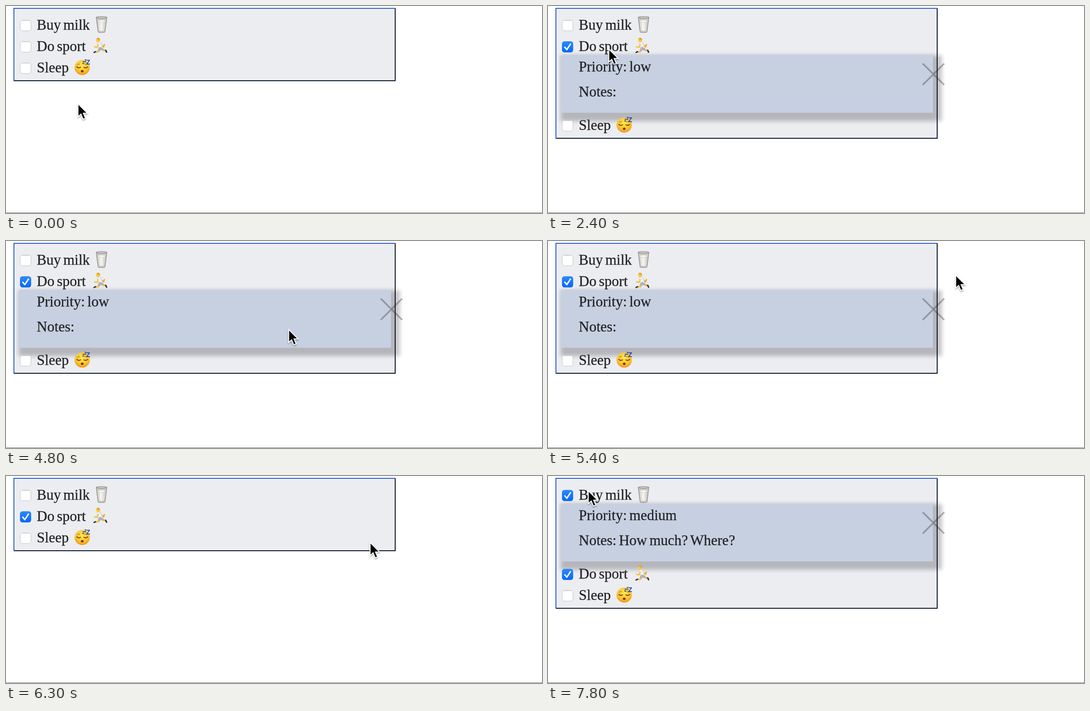
An HTML page for the animation above (7900 ms loop, 1150x446 px).

```html
<!DOCTYPE html>
<html lang="en">
<head>
<meta charset="utf-8">
<title>To-do list</title>
<style>
  html, body { margin: 0; width: 100%; height: 100%; overflow: hidden; background: #fff; }
  svg { display: block; width: 1150px; height: 446px; }
  .label { font: 31px "Liberation Serif", "Noto Serif", serif; word-spacing: -2.5px; fill: #222224; stroke: #222224; stroke-width: .3px; }
  .zzz { font-family: "Liberation Sans", sans-serif; font-weight: bold; fill: #1d3fa0; }
</style>
</head>
<body>
<svg viewBox="0 0 1150 446">
  <defs>
    <filter id="soft" x="-5%" y="-20%" width="110%" height="140%"><feGaussianBlur stdDeviation="4"/></filter>
    <filter id="drop" x="-50%" y="-50%" width="200%" height="200%">
      <feDropShadow dx="0" dy="2" stdDeviation="1.6" flood-color="#000" flood-opacity=".4"/>
    </filter>
    <linearGradient id="blue" x2="0" y2="1"><stop stop-color="#2d89ff"/><stop offset="1" stop-color="#0868f7"/></linearGradient>
    <linearGradient id="milk"><stop stop-color="#cfcdc6"/><stop offset=".45" stop-color="#f8f7f3"/><stop offset="1" stop-color="#cbc9c2"/></linearGradient>
    <radialGradient id="face" cx=".5" cy=".35" r=".68">
      <stop stop-color="#ffe558"/><stop offset=".6" stop-color="#fdc62f"/><stop offset="1" stop-color="#ee8f16"/>
    </radialGradient>

    <g id="box">
      <rect x="30.5" y="30.5" width="23" height="23" rx="5" fill="#fff" stroke="#c3c3c6"/>
      <path d="M34 31.5h16" stroke="#dedee0"/>
    </g>
    <g id="tick">
      <rect x="30" y="30" width="24" height="24" rx="5.5" fill="url(#blue)"/>
      <path d="M36 42.8l4.4 5.2 7.8-12" fill="none" stroke="#fff" stroke-width="3" stroke-linecap="round" stroke-linejoin="round"/>
    </g>

    <g id="glass">
      <path d="M193.500 24l4 31.500q.3 1.500 2 1.500h11q1.700 0 2-1.500l4-31.500z" fill="#c9c8c5" stroke="#777672"/>
      <path d="M196.500 32.500h17l-2.600 20q-6 2.500-11.800 0z" fill="url(#milk)"/>
      <ellipse cx="205" cy="32.500" rx="8.500" ry="2" fill="#fffefa" stroke="#bdbbb5" stroke-width=".7"/>
      <ellipse cx="205" cy="24.500" rx="11.500" ry="1.800" fill="#d8d7d4" stroke="#777672"/>
    </g>
    <g id="runner" fill="none" stroke-linecap="round" stroke-linejoin="round">
      <path d="M204 38l5.500 4 1.500-5" stroke="#efaa24" stroke-width="2.800"/>
      <path d="M205 46l4 3 4.500 1" stroke="#f2b52f" stroke-width="4"/>
      <path d="M200 48l-1.500 4-5.500 1" stroke="#f7c441" stroke-width="4"/>
      <path d="M214 49.500l1.800 4M192 52.500l-3 1.500" stroke="#202d48" stroke-width="3"/>
      <path d="M199.500 35.500l3.500 8" stroke="#c9ced4" stroke-width="9.500"/>
      <path d="M199.500 35.500l3.500 8" stroke="#f1f2f1" stroke-width="7"/>
      <path d="M202 45l4 2M201 46l-1 2.500" stroke="#aab2c1" stroke-width="5.500"/>
      <path d="M198 37l-2.500 6-5.500-1" stroke="#f7c441" stroke-width="2.800"/>
      <circle cx="197.500" cy="27.500" r="4.200" fill="#fac83d"/>
      <path d="M193.800 25q1.700-4.200 6.200-1.800 2.800 1.800 1.600 5.500-2-2.700-7.800-3.700z" fill="#e3a51d"/>
    </g>
    <g id="sleepy" fill="none" stroke-linecap="round">
      <circle cx="163.500" cy="40.500" r="16.300" fill="url(#face)"/>
      <path d="M152 39q3.500 4 8 1M167 40q4.500 3 8-1" stroke="#70420f" stroke-width="1.900"/>
      <path d="M153 34l5-1M169 33l4 1" stroke="#b87a18" stroke-width="1.300"/>
      <ellipse cx="163.500" cy="48.500" rx="3" ry="2.500" fill="#70350c"/>
      <g class="zzz"><text x="163.500" y="32.500" font-size="10">z</text><text x="168" y="29" font-size="10">z</text><text x="172" y="34" font-size="14">Z</text></g>
    </g>
  </defs>

  <rect width="1150" height="446" fill="#fff"/>
  <path d="M0 445.500h1150" stroke="#777"/>
  <g id="card">
    <rect id="fill" x="16" y="4" width="820" fill="#ecedf1"/>
    <path id="dark" fill="#0b1830"/>
    <path id="light" fill="#2a5fd3"/>
  </g>

  <g id="detail">
    <rect x="27" y="60" width="818" height="142" fill="#0a0a18" opacity=".24" filter="url(#soft)"/>
    <rect x="28" y="60" width="798" height="124" fill="#c7d0e1"/>
    <text class="label" id="priority" x="66" y="95"></text>
    <text class="label" id="notes" x="66" y="149"></text>
    <path id="close" d="M804 78l46 46m0-46l-46 46" stroke="#222" stroke-width="3.700"/>
  </g>
  <g id="rows"></g>

  <g id="arrow" filter="url(#drop)">
    <path d="M.5.800V28.500l6.300-5.700 4.600 11 5.100-2.200-4.600-10.600h8.800z" fill="#000" stroke="#fff" stroke-width="1.900"/>
  </g>
  <g id="hand" filter="url(#drop)">
    <path d="M-1.500 2Q1-1.500 4 2l4.500 9q2.500-2.500 5 .5 2.500-2 4.500 1 3-1 4 3l.5 7.500-2.500 4.500v3.500H6.500L4.500 27Q-3 23-7.500 18.500-9 14 -4 15l5 2.500z" fill="#fff" stroke="#000" stroke-width="1.900" stroke-linejoin="round"/>
    <path d="M9 17v8m4-8v8m4-8v8" stroke="#000" stroke-width="1.700"/>
  </g>
</svg>
<script>
const LOOP = 7900, STEP = 100, ROW = 46, GROW = 124;
const $ = id => document.getElementById(id);
const show = (el, on) => el.setAttribute('display', on ? 'inline' : 'none');
const move = (el, x, y) => el.setAttribute('transform', `translate(${x} ${y})`);

const items = [
  { name: 'Buy milk', icon: 'glass', priority: 'medium', notes: 'How much? Where?', checkAt: 7600 },
  { name: 'Do sport', icon: 'runner', priority: 'low', notes: '', checkAt: 1600 },
  { name: 'Sleep', icon: 'sleepy', checkAt: Infinity }
];
const CLOSE_AT = 6200, HOVER = [5700, CLOSE_AT];

// time, x, y of the pointer tip
const path = [
  [0, 154, 210], [800, 46, 92], [1200, 44, 79], [1400, 43, 76],
  [1600, 45, 78], [1900, 128, 92], [2400, 130, 92], [3200, 605, 190],
  [4800, 606, 190], [5500, 890, 66], [5600, 900, 88], [6000, 827, 149],
  [6200, 824, 149], [6900, 43, 34], [7400, 42, 31], [7600, 44, 32], [7800, 86, 31]
];

function pointer(t) {
  const i = path.findIndex(p => p[0] > t);
  if (i < 0) return path[path.length - 1].slice(1);
  const [t0, x0, y0] = path[i - 1], [t1, x1, y1] = path[i];
  const u = (t - t0) / (t1 - t0), e = u * u * (3 - 2 * u);
  return [x0 + (x1 - x0) * e, y0 + (y1 - y0) * e];
}

$('rows').innerHTML = items.map(({ name, icon }) =>
  `<g><use href="#box"/><use href="#tick"/><text class="label" x="66" y="51">${name}</text><use href="#${icon}"/></g>`).join('');
const rows = [...$('rows').children];

function openRow(t) {
  if (t >= items[0].checkAt) return 0;
  return t >= items[1].checkAt && t < CLOSE_AT ? 1 : -1;
}

function draw(t) {
  const open = openRow(t), isOpen = open >= 0;
  const bottom = 162 + (isOpen ? GROW : 0);
  $('fill').setAttribute('height', bottom - 4);
  $('dark').setAttribute('d', `M836 4V${bottom}H16l2-2H834V6z`);
  $('light').setAttribute('d', `M16 ${bottom}V4H836l-2 2H18V${bottom - 2}z`);

  rows.forEach((row, i) => {
    move(row, 0, i * ROW + (isOpen && i > open ? GROW : 0));
    show(row.children[1], t >= items[i].checkAt);
  });

  const hover = t >= HOVER[0] && t < HOVER[1];
  show($('detail'), isOpen);
  if (isOpen) {
    move($('detail'), 0, open * ROW);
    $('priority').textContent = `Priority: ${items[open].priority}`;
    $('notes').textContent = `Notes: ${items[open].notes}`;
    $('close').setAttribute('opacity', hover ? 1 : 0.32);
  }

  const [x, y] = pointer(t);
  show($('arrow'), !hover);
  show($('hand'), hover);
  move($(hover ? 'hand' : 'arrow'), x, y);
}

function tick() {
  const t = performance.now() % LOOP;
  draw(Math.floor(t / STEP) * STEP);
  requestAnimationFrame(tick);
}
tick();
</script>
</body>
</html>
```
